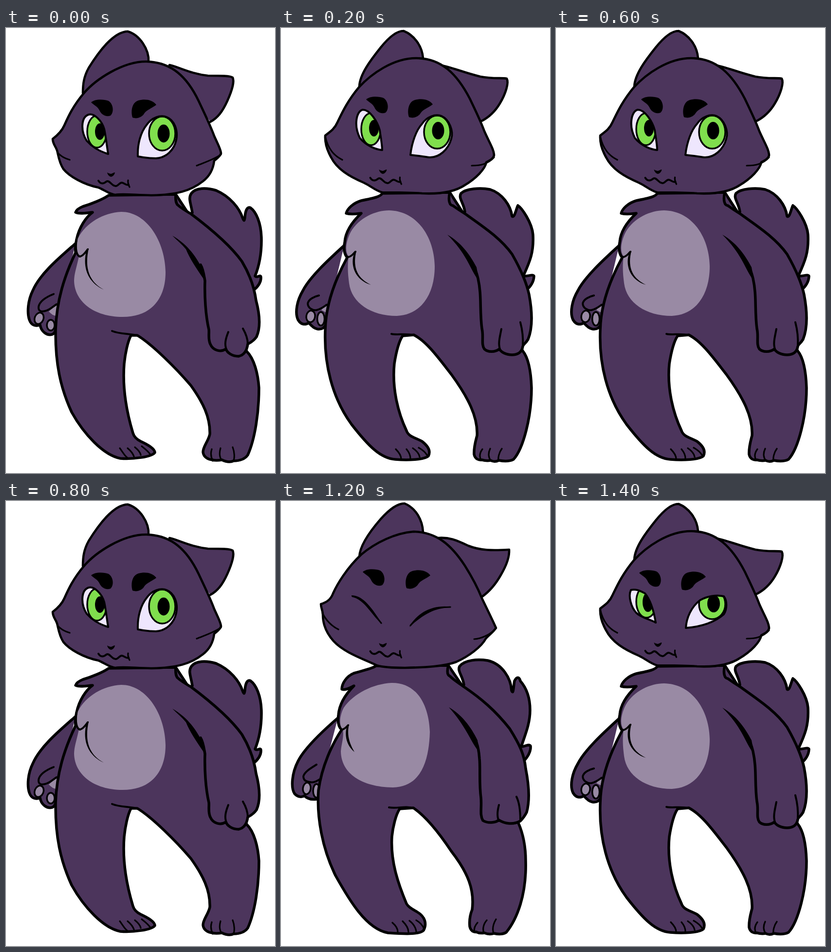
These frames come from a looping animation (553x915 px, 1600 ms). An HTML page without scripts:

```html
<!DOCTYPE html>
<html lang="en">
<head>
<meta charset="utf-8">
<title>Swaying cat</title>
<style>
html, body { margin: 0; width: 100%; height: 100%; overflow: hidden; background: #fff; }
svg { display: block; width: 100vw; height: 100vh; }
path, ellipse, use { stroke-linecap: round; stroke-linejoin: round; }
.fur { fill: #4c355c; stroke: #000; stroke-width: 5.5; }
.head { stroke-width: 4.6; }
.line { fill: none; stroke: #000; stroke-width: 4; }
.fine { stroke-width: 3.2; }
.ink { fill: #000; }
.belly { fill: #998aa4; }
.pad { fill: #998aa4; stroke: #000; stroke-width: 3.5; }
.white { fill: #eee6fd; }
.iris { fill: #80de4d; stroke: #000; stroke-width: 3.5; }

/* sway: left, middle, right, middle; eyes close on the second pass */
@keyframes quarter { 0% { opacity: 1 } 25%, 100% { opacity: 0 } }
@keyframes half { 0% { opacity: 1 } 50%, 100% { opacity: 0 } }
.left, .right { animation: quarter 800ms step-end infinite; }
.right { animation-delay: -400ms; }
.mid { animation: half 400ms step-end -200ms infinite; }
.awake, .sleepy { animation: half 1600ms step-end infinite; }
.sleepy { animation-delay: -800ms; }
</style>
</head>
<body>
<svg viewBox="0 0 553 915">
<defs>
  <g id="mouth">
    <path class="ink" d="M208 297C211 299 213 299 216 300C219 299 221 297 224 297C223 302 220 305 216 306C212 305 209 302 208 297Z"/>
    <path class="line" d="M190 314C195 322 201 320 206 316C212 312 216 322 222 324C230 328 232 318 238 318C243 318 247 325 252 322"/>
    <path class="line fine" d="M251 313C250 318 252 323 254 327"/>
  </g>
  <path id="browL" class="ink" d="M175 147C182 140 200 140 211 144C220 150 223 166 215 174C205 178 195 171 192 163C188 155 180 152 175 147Z"/>
  <path id="browR" class="ink" d="M312 157C305 147 290 144 275 148C262 152 259 170 263 183C272 187 283 182 287 175C292 167 303 164 312 157Z"/>

  <path id="eyeA1" d="M210 259C200 256 180 248 166 232C153 212 154 183 170 178C181 175 197 190 202 208C205 222 207 240 210 259Z"/>
  <path id="eyeA2" d="M271 264C270 240 276 215 290 198C300 184 318 178 330 183C346 189 354 210 350 230C346 250 330 267 308 268C295 268 280 266 271 264Z"/>
  <path id="eyeB1" d="M208 251C195 250 175 242 162 226C149 200 155 171 168 168C183 168 198 192 203 210C205 225 208 240 208 251Z"/>
  <path id="eyeB2" d="M266 261C269 235 278 210 290 197C300 182 318 176 330 181C346 188 355 212 350 228C344 250 325 267 305 266C290 264 278 262 266 261Z"/>
  <path id="eyeH1" d="M205 250C195 244 175 240 165 230C154 218 148 195 154 183C165 180 175 186 183 190C193 202 200 220 205 250Z"/>
  <path id="eyeH2" d="M267 261C268 240 278 218 296 204C310 196 330 192 345 196C352 205 352 222 345 233C330 246 305 258 267 261Z"/>
  <clipPath id="clipA1"><use href="#eyeA1"/></clipPath>
  <clipPath id="clipA2"><use href="#eyeA2"/></clipPath>
  <clipPath id="clipB1"><use href="#eyeB1"/></clipPath>
  <clipPath id="clipB2"><use href="#eyeB2"/></clipPath>
  <clipPath id="clipH1"><use href="#eyeH1"/></clipPath>
  <clipPath id="clipH2"><use href="#eyeH2"/></clipPath>

  <g id="openEyes">
    <g clip-path="url(#clipB1)">
      <use href="#eyeB1" class="white"/>
      <ellipse class="iris" cx="185" cy="208" rx="20" ry="33"/>
      <ellipse cx="191" cy="206" rx="10" ry="17"/>
    </g>
    <g clip-path="url(#clipB2)">
      <use href="#eyeB2" class="white"/>
      <ellipse class="iris" cx="321" cy="214" rx="27" ry="34"/>
      <ellipse cx="323" cy="211" rx="12.5" ry="18"/>
    </g>
    <use href="#eyeB1" class="line"/>
    <use href="#eyeB2" class="line"/>
    <use href="#browL"/>
    <use href="#browR"/>
  </g>
</defs>

<g class="left">
  <path class="fur" d="M383 380C380 360 374 350 381 340C390 328 412 328 432 334C460 346 480 370 487 392C490 398 490 396 491 390C492 375 496 366 503 370C514 378 524 400 525 430C526 465 520 490 512 510C516 515 523 506 524 512C525 522 518 532 510 538"/>
  <path class="fur head" d="M158 134C158 115 160 100 170 82C190 50 220 8 250 7C275 14 295 45 293 70"/>
  <path class="fur head" d="M336 76C360 82 380 94 415 98C440 98 462 98 466 102C470 110 464 130 455 150C445 172 435 185 420 193"/>
  <path class="fur" d="M143 443C110 472 70 505 55 540C45 560 43 585 48 600C52 612 62 614 70 610C72 625 85 633 95 630C103 627 103 615 103 605L120 540"/>
  <path class="belly" d="M88 583L104 568L104 592C98 592 93 588 88 583Z"/>
  <path class="line" d="M98 547C83 553 69 562 67 573C66 582 72 584 80 582C90 580 96 573 104 568"/>
  <ellipse class="pad" cx="68" cy="597" rx="9" ry="12" transform="rotate(22 68 597)"/>
  <ellipse class="pad" cx="92" cy="611" rx="8" ry="11"/>
  <path class="fur" d="M211 344C200 352 175 362 158 367C148 371 144 376 143 379C152 383 165 380 178 379C165 388 150 410 145 435C141 452 143 460 143 462C120 510 104 560 102 620C101 690 112 740 135 790C160 835 200 878 235 885C260 887 300 882 306 873C306 865 292 857 277 850C267 845 263 840 261 833C248 790 239 740 243 690C245 670 250 645 257 632L270 632C300 650 350 700 380 735C405 770 420 800 419 835C416 850 405 860 405 872C406 882 415 887 424 888C432 890 438 889 444 888C452 892 460 894 468 890C482 890 492 885 497 878C512 845 520 790 520 740C518 710 510 680 495 665L440 560L400 420L349 342Z"/>
  <path class="belly" d="M237 378C200 380 165 400 148 432C143 450 144 465 150 469C146 490 140 505 140 520C141 562 180 594 240 594C300 594 328 555 328 502C327 440 290 378 237 378Z"/>
  <path class="line" d="M145 435C142 455 145 468 152 470C160 468 164 460 168 455"/>
  <path class="ink" d="M170 453C162 490 168 520 201 538C171 525 155 495 166 455Z"/>
  <path class="line" d="M218 623C235 630 255 628 272 633"/>
  <path class="fur" d="M349 342C348 352 350 360 352 363C362 372 372 377 380 382C420 412 460 445 485 480C500 505 510 530 514 560C522 590 524 615 515 635C508 645 500 648 497 650C495 665 488 673 478 675C465 675 455 668 452 660C440 668 425 662 420 650C415 640 418 628 417 620C410 590 408 550 409 520C406 500 402 490 400 487"/>
  <path class="ink" d="M342 427C370 443 388 465 403 494L409 520C395 500 378 475 370 455C362 445 352 437 342 427Z"/>
  <path class="line" d="M457 625C451 640 449 650 453 661M487 618C494 630 497 640 497 650"/>
  <path class="line fine" d="M234 864C240 872 244 880 249 883M250 864C256 869 261 875 263 881M265 862C270 866 276 872 277 878M279 860C285 865 291 869 296 876M423 866C420 875 421 882 425 890M441 864C438 874 439 884 444 889M466 862C470 872 470 884 468 889"/>
  <path class="fur head" d="M96 228C104 222 114 214 120 200C128 182 138 160 160 134C185 105 240 69 288 69C340 70 372 100 396 150C410 180 420 200 428 222C436 240 442 250 442 258C440 264 434 268 428 273C426 290 418 305 405 315C380 335 350 343 300 344C270 344 240 340 225 343C215 343 200 332 190 328C160 322 130 305 118 290C110 278 108 265 106 256C104 244 96 240 96 228Z"/>
  <path class="line fine" d="M106 256C112 263 120 268 131 271M442 260C428 270 412 275 392 283"/>
  <g clip-path="url(#clipA1)">
    <use href="#eyeA1" class="white"/>
    <ellipse class="iris" cx="187" cy="213" rx="20" ry="33"/>
    <ellipse cx="193" cy="213" rx="10" ry="17"/>
  </g>
  <g clip-path="url(#clipA2)">
    <use href="#eyeA2" class="white"/>
    <ellipse class="iris" cx="321" cy="217" rx="27" ry="35"/>
    <ellipse cx="324" cy="217" rx="12.5" ry="18.5"/>
  </g>
  <use href="#eyeA1" class="line"/>
  <use href="#eyeA2" class="line"/>
  <use href="#browL" y="6"/>
  <use href="#browR" x="-3" y="1"/>
  <use href="#mouth"/>
</g>

<g class="mid">
  <path class="fur" d="M378 378C376 360 364 350 370 340C380 330 410 328 430 332C455 340 472 365 475 387C480 392 484 370 487 365C495 370 516 400 518 425C520 460 512 480 498 510C505 512 518 505 520 510C520 522 512 533 505 538"/>
  <path class="fur head" d="M161 120C162 95 185 65 205 40C225 15 240 6 252 6C272 14 290 35 292 62"/>
  <path class="fur head" d="M325 76C350 80 370 90 410 100C435 105 455 102 464 104C469 112 462 135 450 155C440 172 425 185 411 192"/>
  <path class="fur" d="M130 447C105 470 60 510 45 540C33 560 28 585 35 600C42 612 52 610 57 606C62 612 68 618 75 619C85 620 90 615 92 610L110 530"/>
  <path class="belly" d="M83 580L94 567L93 585Z"/>
  <path class="line" d="M78 550C68 552 57 558 55 566C55 576 65 581 73 580C82 578 88 573 94 569"/>
  <ellipse class="pad" cx="61" cy="593" rx="9" ry="12" transform="rotate(10 61 593)"/>
  <ellipse class="pad" cx="82" cy="598" rx="7.5" ry="14"/>
  <path class="fur" d="M208 340C205 347 190 350 165 355C148 360 136 372 134 381C145 384 155 382 165 381C150 395 133 415 131 440C128 455 130 465 136 472C110 520 92 570 91 620C88 690 105 760 145 815C180 860 205 885 235 887C260 889 295 888 303 880C308 870 303 860 290 850C275 842 262 840 258 828C240 790 228 740 233 690C237 665 242 645 250 633L273 631C300 645 325 680 350 712C385 760 405 800 403 838C400 850 396 862 397 877C399 886 406 889 413 888C420 890 426 890 431 889C436 892 442 892 448 889C458 891 470 891 478 887C498 865 515 800 515 740C514 710 510 680 497 664L440 560L400 420L347 338Z"/>
  <path class="belly" d="M222 375C195 375 160 390 143 420C133 440 131 460 139 470C136 490 138 510 140 525C145 565 185 592 238 592C290 590 316 545 316 490C315 430 280 376 222 375Z"/>
  <path class="line" d="M131 440C128 460 132 470 138 471C146 470 150 462 153 460"/>
  <path class="ink" d="M155 458C147 490 155 514 185 528C155 520 140 490 151 461Z"/>
  <path class="line" d="M227 629C240 632 255 627 274 632"/>
  <path class="fur" d="M347 338C343 355 347 365 353 365C360 370 372 378 380 383C410 405 450 430 475 465C495 500 505 525 510 548C516 580 518 615 508 640C502 650 498 650 497 655C495 668 485 672 475 672C462 672 452 666 449 660C440 667 425 667 418 660C411 650 417 635 413 618C408 580 413 550 405 515C403 507 402 503 400 499"/>
  <path class="ink" d="M342 425C370 441 388 465 402 492L407 520C390 500 385 468 342 425Z"/>
  <path class="line" d="M453 619C450 635 446 648 450 660M492 605C496 620 498 640 497 655"/>
  <path class="line fine" d="M236 866C242 872 247 880 247 886M258 866C263 872 266 880 266 885M271 864C280 870 284 876 285 882M283 863C290 867 297 873 300 878M414 866C408 874 408 882 411 888M430 865C425 875 427 884 431 889M454 865C448 873 446 884 447 889"/>
  <path class="fur head" d="M91 221C100 214 110 208 116 194C124 178 135 152 160 122C185 95 230 62 278 62C330 62 362 95 388 145C400 170 410 190 418 212C428 235 438 250 438 262C436 270 428 273 422 276C420 290 400 310 378 323C360 335 330 342 290 340C265 338 235 338 208 338C195 335 185 325 170 318C140 305 115 290 103 266C94 250 90 235 91 221Z"/>
  <path class="line fine" d="M91 223C97 250 110 263 126 271M438 266C425 280 410 283 392 283"/>
  <use href="#mouth" x="-6.5" y="-6"/>
  <use href="#openEyes" class="awake"/>
  <g class="sleepy">
    <g clip-path="url(#clipH1)">
      <use href="#eyeH1" class="white"/>
      <ellipse class="iris" cx="186" cy="207" rx="21" ry="33"/>
      <ellipse cx="189" cy="208" rx="11" ry="20"/>
    </g>
    <g clip-path="url(#clipH2)">
      <use href="#eyeH2" class="white"/>
      <ellipse class="iris" cx="321" cy="212" rx="27" ry="31"/>
      <ellipse cx="324" cy="211" rx="13" ry="18"/>
    </g>
    <use href="#eyeH1" class="line"/>
    <use href="#eyeH2" class="line"/>
    <use href="#browL" x="-4" y="1"/>
    <use href="#browR" x="-4" y="-1"/>
  </g>
</g>

<g class="right">
  <path class="fur" d="M376 378C374 360 362 350 367 340C378 326 405 325 425 328C455 335 473 365 474 390C478 400 478 380 480 370C485 360 490 362 492 370C505 385 512 405 512 430C512 460 500 485 494 505C500 506 510 498 513 504C514 515 508 525 500 534"/>
  <path class="fur head" d="M161 115C162 90 185 60 205 37C225 15 240 5 254 5C278 15 291 40 292 64"/>
  <path class="fur head" d="M322 76C345 74 360 80 385 92C410 102 435 102 469 100C470 115 462 135 452 152C443 168 430 185 413 197"/>
  <path class="fur" d="M117 446C95 465 50 505 35 535C22 560 20 590 28 602C36 610 44 609 48 606C54 612 62 615 74 613L95 530"/>
  <path class="line" d="M73 542C62 549 49 556 46 566C46 575 52 577 60 578C68 580 75 575 80 572"/>
  <ellipse class="pad" cx="53" cy="591" rx="8" ry="12" transform="rotate(8 53 591)"/>
  <ellipse class="pad" cx="73" cy="596" rx="7" ry="14"/>
  <path class="fur" d="M195 339C190 344 170 348 150 354C135 360 125 375 125 387C132 390 142 384 150 380C135 395 120 415 118 440C116 455 118 465 125 470C105 500 84 545 77 595C73 650 85 715 112 770C140 820 175 880 220 888C250 890 285 892 293 883C300 870 297 855 280 845C268 838 262 835 258 828C240 785 225 740 228 690C230 670 236 645 244 633L272 631C300 650 330 690 350 720C385 765 398 800 393 840C387 855 387 865 388 875C390 884 396 887 401 886C407 889 412 889 418 888C425 891 432 891 438 889C446 891 456 891 463 887C485 860 505 810 503 740C503 710 498 685 488 662L440 560L400 420L344 338Z"/>
  <path class="belly" d="M227 374C190 376 150 395 129 425C120 442 119 463 127 469C130 485 124 500 123 515C124 560 165 588 230 589C285 588 304 540 306 475C304 420 280 373 227 374Z"/>
  <path class="line" d="M118 440C116 460 120 470 126 470C132 468 135 464 138 461"/>
  <path class="ink" d="M140 459C135 480 140 497 151 516C136 504 129 483 136 462Z"/>
  <path class="line" d="M222 630C240 633 255 626 273 632"/>
  <path class="fur" d="M344 338C341 350 342 358 347 360C355 368 368 376 376 382C410 405 440 430 470 468C490 500 500 520 503 550C510 585 512 615 505 640C500 650 495 655 492 658C478 666 460 664 448 656C440 662 425 663 415 657C408 645 413 630 411 610C407 580 410 550 408 530C407 515 405 505 402 497"/>
  <path class="ink" d="M345 424C370 438 390 463 404 492L407 515C392 500 382 465 345 424Z"/>
  <path class="line" d="M448 625C444 640 444 650 448 658M484 608C490 620 492 640 492 656"/>
  <path class="line fine" d="M229 867C236 873 240 880 240 886M250 864C258 872 262 880 262 886M264 863C273 870 277 878 278 885M278 862C288 868 292 874 294 880M404 867C398 874 396 880 398 886M423 862C416 870 414 880 417 888M442 860C436 870 434 880 437 889"/>
  <path class="fur head" d="M82 212C92 209 102 204 107 190C115 172 135 138 165 110C195 85 235 66 272 63C320 64 350 90 378 133C395 160 405 180 413 200C425 225 435 245 442 261C436 270 428 275 421 283C412 300 385 320 360 331C335 340 300 342 255 343C230 343 210 342 197 338C170 325 130 312 108 288C92 270 86 250 86 234C86 225 82 220 82 212Z"/>
  <path class="line fine" d="M85 230C92 245 105 258 118 264M442 262C430 275 412 283 397 284"/>
  <use href="#mouth" x="-6.5" y="-5"/>
  <g class="awake"><use href="#openEyes" x="-2" y="-2"/></g>
  <g class="sleepy">
    <path class="ink" d="M145 194C170 194 188 222 208 253C188 238 174 204 145 196Z"/>
    <path class="ink" d="M264 259C280 228 315 212 351 218C316 219 292 234 264 259Z"/>
    <path class="line fine" d="M147 196C170 200 185 225 206 251M266 256C285 232 315 218 348 218"/>
    <use href="#browL" x="-7" y="-1"/>
    <use href="#browR" x="-5" y="-4"/>
  </g>
</g>
</svg>
</body>
</html>
```
